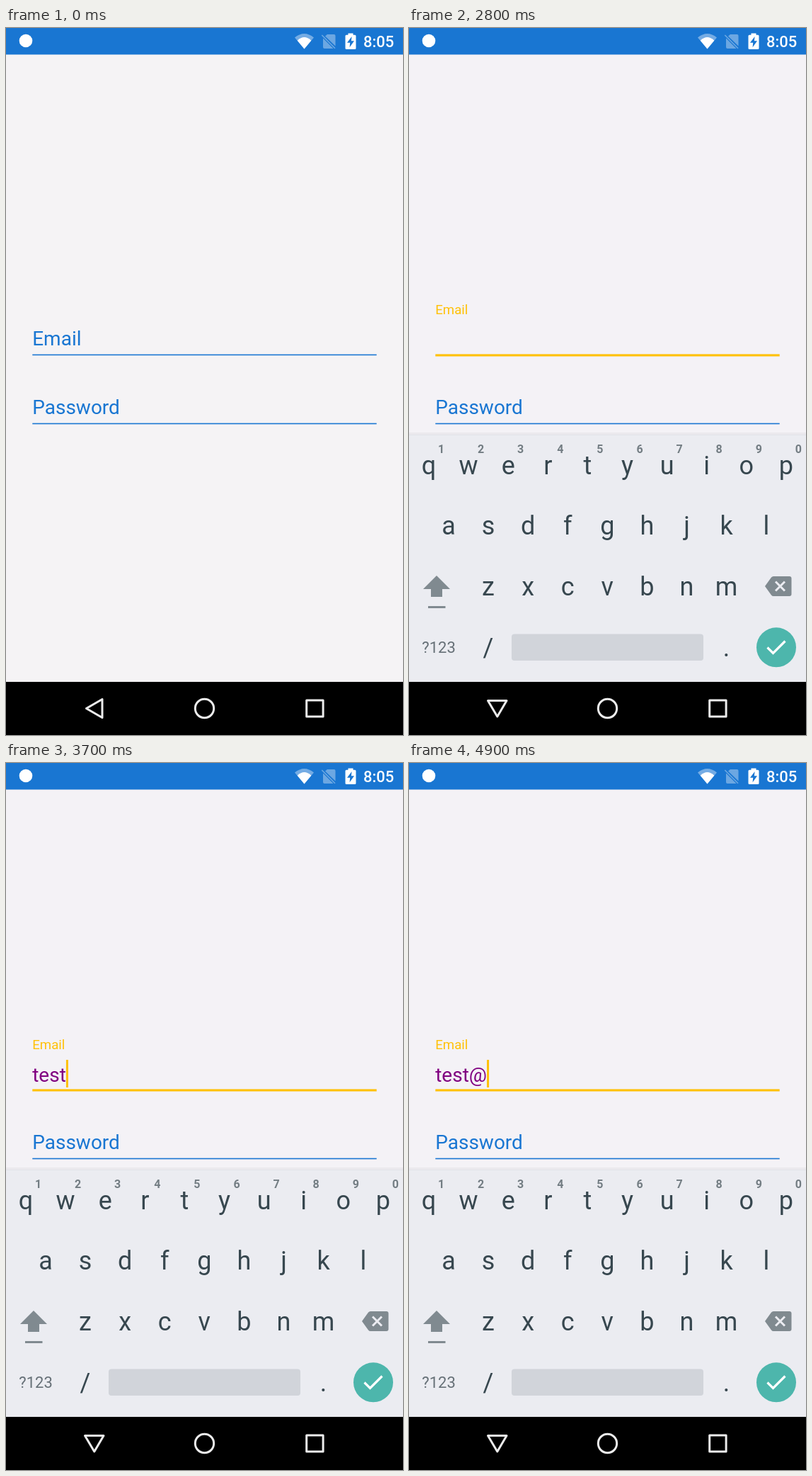
Write an HTML page that moves like this. It is 561 px wide and 998 px high and loops after 5000 ms.

```html
<!DOCTYPE html>
<html lang="en">
<head>
<meta charset="utf-8">
<title>Sign-in form</title>
<style>
  html, body { margin: 0; width: 100%; height: 100%; overflow: hidden; background: #f5f3f5; }
  svg { display: block; width: 100%; height: 100%; font-family: Roboto, sans-serif; }
  .key { font-size: 36px; fill: #37474f; text-anchor: middle; }
  .hint { font-size: 16px; font-weight: 700; fill: #737d83; text-anchor: middle; }
  .mode { font-size: 22px; fill: #667077; text-anchor: middle; }
  .field { font-size: 28px; }
</style>
</head>
<body>
<svg viewBox="0 0 561 998">
  <defs>
    <filter id="shadow" x="-20%" y="-10%" width="140%" height="125%">
      <feDropShadow dx="0" dy="2" stdDeviation="1.5" flood-color="#000" flood-opacity=".4"/>
    </filter>
  </defs>

  <rect id="bg" width="561" height="998"/>

  <g id="status">
    <rect width="561" height="37.5" fill="#1976d2"/>
    <circle cx="28" cy="18" r="9.3" fill="#fff"/>
    <path d="M408 13.5Q421.5 2.5 435 13.5L421.5 29.5Z" fill="#fff" opacity=".4"/>
    <path d="M411.7 17.7Q421.5 8.5 431.3 17.7L421.5 29.5Z" fill="#fff"/>
    <g fill="#fff" opacity=".36">
      <path d="M454 9H463.5Q465.5 9 465.5 11V25.5L451 11.5Z"/>
      <path d="M448 14.5L462.5 29H450Q448 29 448 27Z"/>
      <path d="M446.3 10L465 28.8" stroke="#fff" stroke-width="1.6"/>
    </g>
    <path d="M483.5 9.7V7.5H490.5V9.7H493Q494.5 9.7 494.5 11.2V28.5Q494.5 30 493 30H481Q479.5 30 479.5 28.5V11.2Q479.5 9.7 481 9.7Z" fill="#fff"/>
    <path d="M488.6 12L482 20.7H486.2L485.6 27.3L492 18.3H487.9Z" fill="#1976d2"/>
    <text x="505" y="27" font-size="22" font-weight="500" fill="#fff">8:05</text>
  </g>

  <g id="form">
    <text id="label" x="37.2">Email</text>
    <text id="typed" class="field" x="37.2" y="449.5" fill="#800080"></text>
    <rect id="line" x="37.3" width="486.4"/>
    <rect id="cursor" y="419" width="3" height="39" fill="#ffc107"/>
    <text class="field" x="37.2" y="545" fill="#1976d2">Password</text>
    <rect x="37.3" y="557.7" width="486.4" height="1.6" fill="#1976d2"/>
  </g>

  <g id="board">
    <rect y="571" width="561" height="3" fill="#000" opacity=".035"/>
    <rect y="574" width="561" height="349" fill="#ebecf1"/>
    <rect y="574" width="561" height="1" fill="#e1e3e8"/>
    <g id="letters"></g>
    <g id="symbols"></g>
    <path d="M503 788L512 775.5Q513.2 774 515 774H537.5Q540.5 774 540.5 777V799Q540.5 802 537.5 802H515Q513.2 802 512 800.5Z" fill="#808a90"/>
    <path d="M518 781.5L531 794.5M531 781.5L518 794.5" stroke="#ebecf1" stroke-width="3"/>
    <circle cx="519" cy="874.3" r="28" fill="#4db6ac"/>
    <path d="M506.5 874.5L514.5 882.5L531.5 865.5" fill="none" stroke="#fff" stroke-width="3.2"/>
  </g>

  <g id="popup">
    <rect x="-38" width="76" height="178.5" rx="3" fill="#d0d3da" filter="url(#shadow)"/>
    <text id="popKey" y="64" font-size="55" fill="#37474f" text-anchor="middle"></text>
    <g id="dots" fill="#9ba1a7">
      <circle cx="17.5" cy="84.5" r="2.1"/>
      <circle cx="25" cy="84.5" r="2.1"/>
      <circle cx="32.3" cy="84.5" r="2.1"/>
    </g>
  </g>

  <g id="nav">
    <rect y="923" width="561" height="75"/>
    <g fill="none" stroke="#ececec" stroke-width="3" stroke-linejoin="round">
      <path id="back"/>
      <circle cx="280.5" cy="960.5" r="13.2"/>
      <rect x="424.7" y="949" width="23.4" height="23"/>
    </g>
  </g>
</svg>
<script>
const $ = id => document.getElementById(id);
const NS = 'http://www.w3.org/2000/svg';
const LOOP = 5000, STEP = 100, COL = 56.1;
const BLUE = [25, 118, 210], AMBER = [255, 193, 7];
const clamp = v => Math.max(0, Math.min(1, v));
const mix = (a, b, p) => `rgb(${a.map((v, i) => Math.round(v + (b[i] - v) * p))})`;
const rowY = r => 629.5 + 85.7 * r;
const show = (id, on) => $(id).setAttribute('display', on ? 'inline' : 'none');

function add(parent, tag, attrs, text = '') {
  const el = document.createElementNS(NS, tag);
  for (const k in attrs) el.setAttribute(k, attrs[k]);
  el.textContent = text;
  parent.append(el);
}

function keys(parent, chars, x, y, cls = 'key') {
  [...chars].forEach((c, i) => {
    if (c !== ' ') add(parent, 'text', { class: cls, x: x + COL * i, y }, c);
  });
}

function space(parent, x, width) {
  add(parent, 'rect', { x, y: 855.5, width, height: 37.5, rx: 4, fill: '#d1d4da' });
}

const abc = $('letters'), sym = $('symbols');
keys(abc, 'qwertyuiop', 28, rowY(0));
keys(abc, '1234567890', 45.5, 599.5, 'hint');
keys(abc, 'asdfghjkl', 56, rowY(1));
keys(abc, 'zxcvbnm', 112, rowY(2));
keys(abc, '/     .', 112, rowY(3));
add(abc, 'text', { class: 'mode', x: 42, y: 882 }, '?123');
add(abc, 'path', { d: 'M39 773L58 792H47V803H31V792H20Z', fill: '#808a90' });
add(abc, 'rect', { x: 27, y: 816, width: 24.5, height: 3, fill: '#808a90' });
space(abc, 145, 271);

keys(sym, '1234567890', 28, rowY(0));
keys(sym, '@#$%&-+()', 56, rowY(1));
keys(sym, '*"\':;!?', 112, rowY(2));
keys(sym, ',_   /.', 112, rowY(3));
add(sym, 'text', { class: 'mode', x: 42, y: 882 }, 'ABC');
add(sym, 'text', { class: 'mode', x: 39.5, y: 796, style: 'font-size:20px' }, '= \\ <');
space(sym, 201, 159);

// [from, to, key, centre x, top]
const presses = [
  [2900, 3100, 't', 252.4, 474],
  [3100, 3300, 'e', 140.2, 474],
  [3400, 3600, 's', 112.1, 560],
  [3600, 3700, 't', 252.4, 474],
  [4600, 4700, '@', 56, 560]
];
const typing = [[3000, 't'], [3200, 'te'], [3500, 'tes'], [3600, 'test'], [4700, 'test@']];

function draw(t) {
  const focused = t >= 2300;
  $('bg').setAttribute('fill', t >= 2400 ? '#f4f2f6' : '#f5f3f5');

  const p = clamp((t - 2200) / 200), label = $('label');
  label.setAttribute('y', 448 - 44 * p ** 3);
  label.setAttribute('font-size', 28 - 9.33 * p);
  label.setAttribute('fill', mix(BLUE, AMBER, p ** 1.6));

  $('line').setAttribute('y', focused ? 460.4 : 460.6);
  $('line').setAttribute('height', focused ? 3.1 : 1.6);
  $('line').setAttribute('fill', mix(BLUE, AMBER, focused ? 1 : 0));

  const last = typing.filter(e => e[0] <= t).pop() || [2300, ''];
  $('typed').textContent = last[1];
  const width = last[1] ? $('typed').getComputedTextLength() : 0;
  $('cursor').setAttribute('x', 37.3 + width);
  show('cursor', focused && (t - last[0]) % 1000 < 500);

  const k = 1 - (1 - clamp((t - 2300) / 300)) ** 2;
  $('board').setAttribute('opacity', k);
  $('board').setAttribute('transform', `translate(0 ${35 * (1 - k)})`);
  const symbols = t >= 4200 && t < 4900;
  show('letters', !symbols);
  show('symbols', symbols);

  const press = presses.find(e => t >= e[0] && t < e[1]);
  show('popup', press);
  if (press) {
    const [, , key, x, y] = press;
    $('popup').setAttribute('transform', `translate(${x} ${y})`);
    $('popKey').textContent = key;
    show('dots', key !== '@');
  }

  $('back').setAttribute('d', focused
    ? 'M111.5 949.5H138L124.8 972Z'
    : 'M113.5 960.5L136 947.5V973.5Z');
}

function tick() {
  const t = performance.now() % LOOP;
  draw(Math.floor(t / STEP) * STEP);
  requestAnimationFrame(tick);
}
tick();
</script>
</body>
</html>
```
